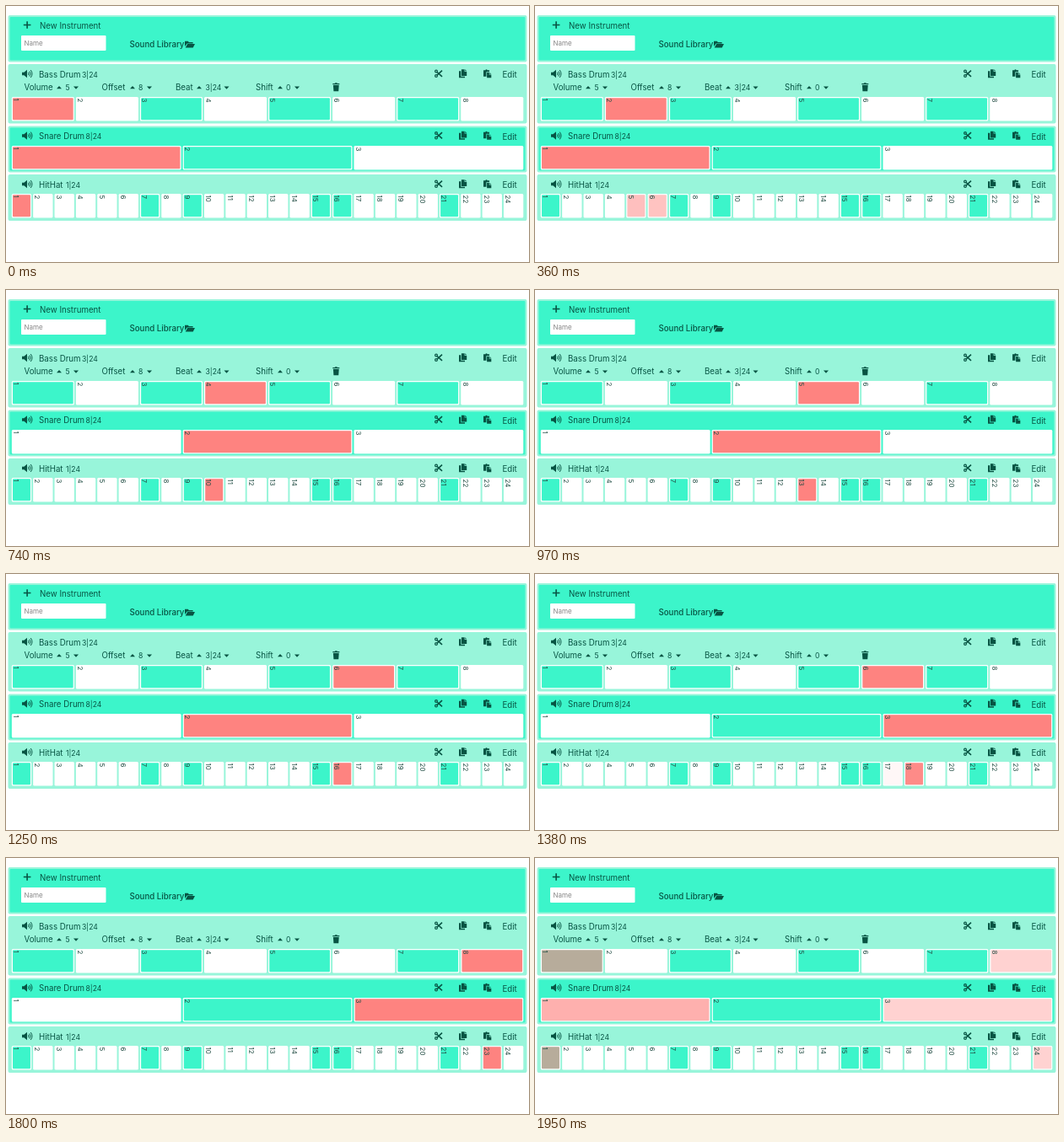
Animation of 620 by 304 pixels, one loop 2 s. Source, as an HTML page:

```html
<!DOCTYPE html>
<html lang="en">
<head>
<meta charset="utf-8">
<title>Drum sequencer</title>
<style>
html, body { margin: 0; width: 100%; height: 100%; overflow: hidden; background: #fff; }
svg { display: block; font: 9.7px Inter, "Open Sans", sans-serif; fill: #075443; }
.small { font-size: 8.6px; }
.num { font-size: 8px; fill: #244f46; }
.line { fill: none; stroke: #075443; stroke-width: 1.2; }
</style>
</head>
<body>
<svg id="stage" width="620" height="304" viewBox="0 0 620 304">
  <defs>
    <g id="speaker">
      <path d="M0 3.3h2.4L6 .3v9.4L2.4 6.7H0z"/>
      <path class="line" d="M7.3 3.4q1.3 1.6 0 3.2M8.8 2q2.4 3 0 6M10.3 .6q3.3 4.4 0 8.8" style="stroke-width:1"/>
    </g>
    <g id="scissors">
      <path class="line" d="M3 3.2L9 8.6M3 6.8L9 1.4" style="stroke-width:1.6"/>
      <circle class="line" cx="2" cy="2.2" r="1.4"/>
      <circle class="line" cx="2" cy="7.8" r="1.4"/>
    </g>
    <path id="copy" d="M0 2h2.2v6.4H7V10H0zM2.9 0H6.6v2.6H9.2v5.1H2.9zM7.3 0L9.2 1.9H7.3z"/>
    <path id="paste" d="M0 1h2.2q1.3-2 2.6 0H7v1.9H3.4v5.6H0zM4.1 3.6H6.8v2.5h2.5V10H4.1zM7.4 3.6l1.9 1.9H7.4z"/>
    <path id="trash" d="M0 .8h2.4L3 0h2l.6 .8H8V2H0zM.6 2.7h6.8L6.9 10H1.1z"/>
    <path id="folder" d="M0 7.5V1.2h3.7l1.2 1.2h4.7v1.5H2.7zM3.2 4.6H12L9.7 9H.7z"/>
  </defs>
</svg>
<script>
const stage = document.getElementById("stage");
const LOOP = 2000, STEP = LOOP / 24, LEAD = 78, FADE = 44;
const WHITE = [255, 255, 255], TEAL = [60, 245, 202], RED = [254, 131, 128];
const LIGHT = "#98f5da", rgb = c => `rgb(${c})`;

function add(tag, attrs, content) {
  const el = document.createElementNS("http://www.w3.org/2000/svg", tag);
  for (const key in attrs) el.setAttribute(key, attrs[key]);
  if (content !== undefined) el.textContent = content;
  return stage.appendChild(el);
}
const rect = (x, y, width, height, fill, rx = 1) => add("rect", { x, y, width, height, fill, rx });
const text = (x, y, content, attrs) => add("text", { x, y, ...attrs }, content);
const icon = (name, x, y) => add("use", { href: "#" + name, x, y });
const arrow = (x, y, dir) => add("path", { d: `M${x - 3} ${y}h6l-3 ${3.2 * dir}z` });

function panel(y, height, fill) {
  rect(2.5, y, 615, height, LIGHT, 2);
  rect(4.5, y + 2, 611, height - 4, fill, 1);
}

function control(x, label, upX, value, valueX, downX) {
  text(x, 100.3, label);
  arrow(upX, 98.2, -1);
  text(valueX, 100.3, value, { class: "small" });
  arrow(downX, 95.6, 1);
}

// One instrument: header, buttons and a row of beat cells.
function track({ y, height, fill, name, beat, beatX, cellY, count, on }) {
  panel(y, height, fill);
  icon("speaker", 19, y + 6.5);
  text(39, y + 15.5, name);
  text(beatX, y + 15.5, beat, { class: "small" });
  icon("scissors", 508, y + 6.3);
  icon("copy", 537, y + 6.3);
  icon("paste", 566, y + 6.3);
  text(588.5, y + 16.3, "Edit");
  const pitch = 608.5 / count;
  return Array.from({ length: count }, (_, i) => {
    const x = 6.8 + i * pitch, w = pitch - 2;
    rect(x, cellY, w, 28.5, "#fff", 1.5);
    const box = rect(x + 1.2, cellY + 1.2, w - 2.4, 26.1, "#fff");
    add("text", { transform: `translate(${x + 2.3} ${cellY + 1.5}) rotate(90)`, class: "num" }, i + 1);
    return { box, base: on.includes(i + 1) ? TEAL : WHITE };
  });
}

panel(11, 55.5, rgb(TEAL));
add("path", { d: "M20.8 22.5h8.6M25.1 18.2v8.6", class: "line", style: "stroke-width:1.6" });
text(40, 27.2, "New Instrument");
rect(18, 35, 100.5, 18, "#fff", 1);
text(21.5, 47.4, "Name", { style: "font-size:8px;fill:#858585" });
text(146.5, 49, "Sound Library", { "font-weight": 500 });
icon("folder", 212, 40.5);

const rows = [
  { y: 69, height: 70.5, fill: LIGHT, name: "Bass Drum", beat: "3|24", beatX: 90,
    cellY: 108, count: 8, on: [1, 3, 5, 7] },
  { y: 142.5, height: 55, fill: rgb(TEAL), name: "Snare Drum", beat: "8|24", beatX: 94.5,
    cellY: 166, count: 3, on: [2] },
  { y: 200, height: 55, fill: LIGHT, name: "HitHat", beat: "1|24", beatX: 71,
    cellY: 223, count: 24, on: [1, 7, 9, 15, 16, 21] }
].map(track);

control(21.5, "Volume", 63, "5", 70.5, 83);
control(113.5, "Offset", 150, "8", 157, 170);
control(201, "Beat", 229, "3|24", 236.5, 261.5);
control(296, "Shift", 325, "0", 332, 345);
icon("trash", 387.3, 91.3);

const mix = (a, b, p) => a.map((v, i) => Math.round(v + (b[i] - v) * p));

function draw(now) {
  const time = (now + LEAD) % LOOP;
  for (const cells of rows) {
    const span = STEP * 24 / cells.length;
    const active = Math.floor(time / span);
    const previous = (active + cells.length - 1) % cells.length;
    const p = Math.min(1, (time % span) / FADE);
    cells.forEach(({ box, base }, i) => {
      const glow = i === active ? p : i === previous ? 1 - p : 0;
      box.setAttribute("fill", rgb(mix(base, RED, glow)));
    });
  }
}

let start;
function tick(now) {
  start ??= now;
  draw(now - start);
  requestAnimationFrame(tick);
}
draw(0);
requestAnimationFrame(tick);
</script>
</body>
</html>
```
